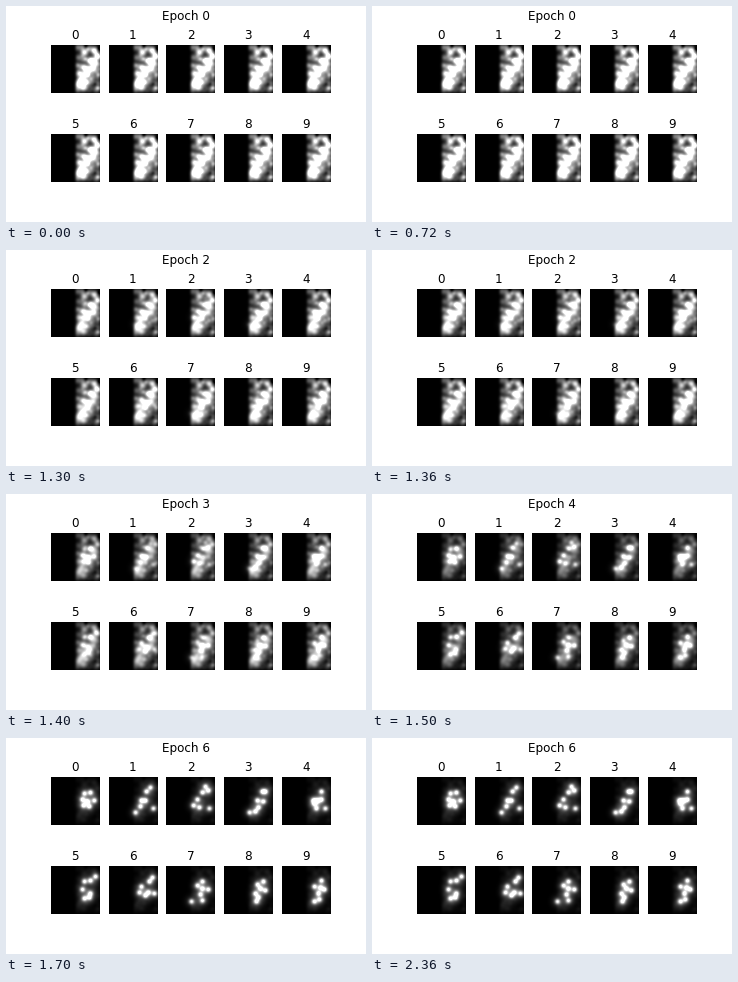
A matplotlib script that plays this animation: 360 px wide and 216 px high, repeating every 2800 ms.

```python
import numpy as np
import matplotlib.pyplot as plt
from matplotlib.animation import FuncAnimation

plt.rcParams["font.family"] = "DejaVu Sans"

SIZE = 49
STEP_MS = 100
HOLD = 12          # steps spent on epoch 0
LAST = 6           # final epoch
STEPS = 28

yy, xx = np.mgrid[0:SIZE, 0:SIZE]


def blob(x, y, width, height=1.0):
    return height * np.exp(-((xx - x) ** 2 + (yy - y) ** 2) / (2 * width ** 2))


def field(points, width, height):
    return sum(blob(x, y, width, height) for x, y in points)


# Shared starting density: strong clumps, then soft ones
strong = [(33, 8), (43, 6), (46, 12), (39, 16), (43, 18), (32, 23), (37, 25),
          (42, 24), (28, 29), (35, 30), (29, 36), (27, 40), (34, 37), (32, 43)]
soft = [(26, 3), (31, 3), (38, 4), (27, 13), (32, 15), (26, 21), (47, 20),
        (46, 28), (42, 32), (40, 37), (46, 39), (38, 44), (45, 45), (26, 45)]

# Bright spots each panel settles on
spots = [
    [(33, 17), (39, 16), (31, 23), (36, 25), (43, 24), (32, 29), (38, 30)],
    [(41, 11), (37, 15), (32, 24), (36, 24), (31, 30), (26, 36), (44, 32)],
    [(39, 10), (36, 16), (42, 14), (31, 23), (27, 29), (33, 31), (43, 32)],
    [(38, 15), (41, 15), (33, 24), (39, 25), (34, 31), (25, 36), (31, 35)],
    [(39, 15), (31, 24), (35, 24), (39, 23), (32, 27), (34, 32), (43, 32)],
    [(33, 16), (39, 15), (44, 11), (31, 24), (39, 28), (33, 33), (38, 32)],
    [(43, 12), (40, 16), (32, 21), (30, 27), (36, 30), (39, 27), (45, 28)],
    [(36, 16), (31, 20), (36, 23), (42, 24), (34, 29), (36, 35), (25, 36)],
    [(39, 16), (33, 19), (36, 23), (31, 28), (41, 25), (34, 32), (32, 36)],
    [(39, 15), (32, 21), (38, 22), (42, 24), (36, 28), (37, 34), (32, 36)],
]

rng = np.random.default_rng(4)
grain = sum(blob(x, y, 1.5, h) for x, y, h in zip(
    rng.uniform(26, 48, 60), rng.uniform(1, 48, 60), rng.uniform(-0.25, 0.3, 60)))
edge = 1 / (1 + np.exp(-(xx - 23.5) / 0.8))
base = (field(strong, 2.6, 1.0) + field(soft, 2.4, 0.42) + grain) * edge
base = np.clip(base, 0, 1.6)
peaks = [field(p, 1.8, 0.85) + 0.22 * field(p, 3.8, 1.0) for p in spots]


def density(panel, epoch):
    fade = np.exp(-0.068 * epoch ** 2)
    return np.clip(base * fade + peaks[panel] * (1 - fade), 0, 1)


fig, axes = plt.subplots(2, 5, figsize=(5, 3), dpi=72, facecolor="white")
fig.subplots_adjust(left=0.125, right=0.9, bottom=0.125, top=0.88,
                    wspace=0.2, hspace=0.2)
heading = fig.suptitle("Epoch 0", fontsize=12)
images = []
for i, ax in enumerate(axes.flat):
    images.append(ax.imshow(density(i, 0), cmap="gray", vmin=0, vmax=1,
                            interpolation="bilinear"))
    ax.set_title(str(i), fontsize=12)
    ax.axis("off")


def update(step):
    epoch = min(max(step - HOLD + 1, 0), LAST)
    heading.set_text(f"Epoch {epoch}")
    for i, image in enumerate(images):
        image.set_data(density(i, epoch))
    return [heading, *images]


anim = FuncAnimation(fig, update, frames=STEPS, interval=STEP_MS,
                     repeat=True, repeat_delay=0, blit=False)
plt.show()
```
